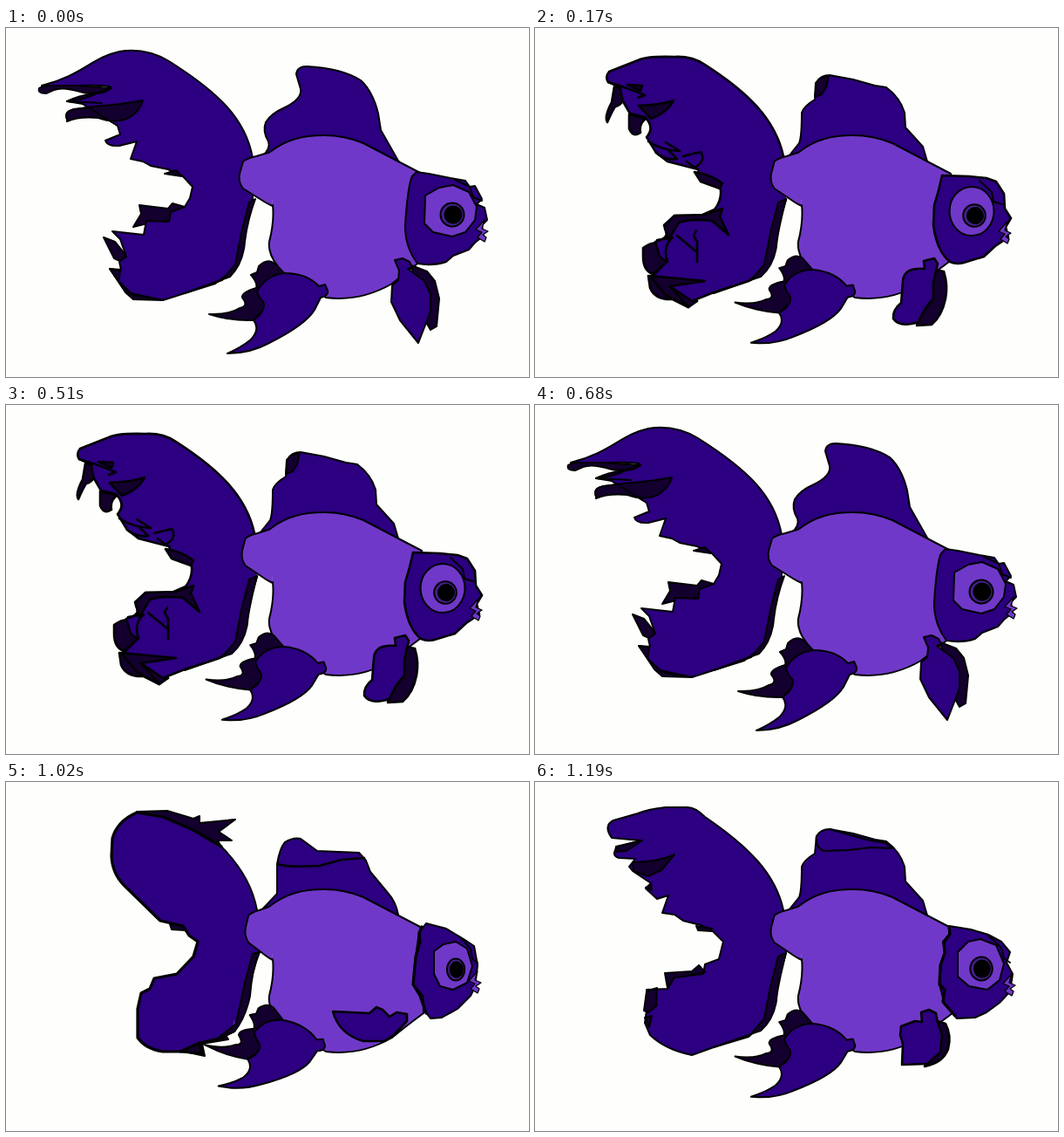
Recreate the animation shown at these times as an HTML page without scripts. Size 600 by 400 pixels, loop 1.36 s.

```html
<!DOCTYPE html>
<html lang="en">
<head>
<meta charset="utf-8">
<title>Swimming goldfish</title>
<style>
  html, body { margin: 0; width: 100%; height: 100%; overflow: hidden; background: #fefefc; }
  svg { display: block; width: 600px; height: 400px; }
  path, ellipse { stroke: #000; stroke-width: 2; stroke-linejoin: round; stroke-linecap: round; vector-effect: non-scaling-stroke; }
  .fin { fill: #2c0080; }
  .skin { fill: #7038c8; }
  .shade { fill: #14002e; }
  .ring { fill: #43208a; }
  .line { fill: none; }
  .bold { stroke-width: 3.2; }
  .firm { stroke-width: 2.6; }
  .thin { stroke-width: 1.3; }

  .pose { visibility: hidden; animation: once 1360ms step-end infinite; }
  .spread { animation: half 680ms step-end infinite; }
  .twice { animation-name: twice; }
  .curl { animation-delay: -1190ms; }
  .curled { animation-delay: -1020ms; }
  .fold { animation-delay: -510ms; }
  .folded { animation-delay: -340ms; }
  @keyframes half { 0% { visibility: visible; } 25%, 100% { visibility: hidden; } }
  @keyframes once { 0% { visibility: visible; } 12.5%, 100% { visibility: hidden; } }
  @keyframes twice {
    0%, 25% { visibility: visible; }
    12.5%, 37.5%, 100% { visibility: hidden; }
  }
</style>
</head>
<body>
<svg viewBox="0 0 600 400">
  <defs>
    <path id="stub" class="skin" d="M306 204Q297 200 293 197L272 184Q266 176 268 167L272 153Q277 149 287 147L304 142"/>
    <g id="trunk">
      <path class="skin" d="M303 142C321 128 340 123 365 123Q388 123 410 132L477 167L479 265Q456 282 443 293C415 309 390 312 367 309L318 280Q300 262 302 245Q308 222 306 203"/>
      <rect class="skin" x="301" y="145" width="10" height="52"/>
    </g>
    <g id="pelvic">
      <path class="shade" d="M319 281L307 269Q299 264 290 273L288 280L281 283Q289 292 287 298Q270 303 271 309Q279 319 268 321Q255 329 233 328Q258 336 284 335L300 318Z"/>
      <path class="fin" d="M359 296Q345 281 320 281Q298 283 288 302Q290 309 295 314Q298 320 291 329L284 335Q292 345 281 357Q270 366 254 373Q280 373 302 361Q344 340 354 323L361 309Q370 307 369 301L366 294Z"/>
    </g>
    <g id="pupil">
      <ellipse class="ring" rx="13.5" ry="13.5"/>
      <ellipse cx="1" rx="9.5" ry="9.5"/>
    </g>
    <path id="mouth" class="skin thin" d="M549 220L539 231L546 234L541 240L549 245L551 240L547 237L553 233L546 230Z"/>
    <path id="dorsal-mid" class="fin" d="M291 147L303 132Q306 125 306 97Q309 89 321 82L323 62Q328 54 338 54L365 59L390 66L403 68Q419 80 424 97L425 114L445 136L450 153"/>
    <path id="dorsal-low" class="fin" d="M293 147L311 128L311 94Q314 76 320 69Q330 63 338 65L357 79L405 81L413 90L418 103L438 127Q447 137 450 152"/>
    <path id="pectoral-low" class="fin firm" d="M375 263L417 265L425 258L432 261L440 269L448 264L460 266V274L445 290L434 297H410Q382 289 375 263Z"/>
    <path id="edge-mid" class="shade" d="M288 196Q278 235 277 250Q274 272 259 285L205 304L248 289L263 271L270 235L279 200Z"/>
    <path id="edge-low" class="shade" d="M291 195Q282 215 280 245Q275 270 262 286L240 296L264 277L274 230L283 197Z"/>
    <g id="body-mid">
      <use href="#stub" transform="translate(306) scale(.923 1) translate(-306)"/>
      <use href="#trunk"/>
      <use href="#pelvic" transform="matrix(1 .1 -.06 .982 16.2 -30.9)"/>
    </g>
    <g id="body-low">
      <use href="#stub" transform="translate(306) scale(.82 1) translate(-306)"/>
      <use href="#trunk"/>
      <use href="#pelvic" transform="matrix(1 .2 -.1 .965 27 -62.2)"/>
    </g>
  </defs>

  <g class="pose spread">
    <path class="shade" d="M38 69Q45 63 80 66L121 69Q100 78 85 73Q65 67 55 71L46 75Q36 75 38 69ZM70 84Q85 77 97 76L112 75L100 86ZM70 105Q66 96 78 93L98 91ZM153 203L186 207L191 201L205 205L192 220L158 225L146 228L155 213ZM112 240L125 245L138 261L133 268L124 264Z"/>
    <path class="fin" d="M283 149C275 104 244 74 187 38Q160 22 130 27C98 34 88 54 41 66L82 66Q122 65 121 69Q113 75 104 75Q92 82 70 84L88 87L128 112L131 122L114 129Q116 136 130 135L150 130L143 150L157 153L166 158L186 162L203 170L214 182L211 195L205 205L189 211L187 222L161 221L158 237L122 233L131 242L138 262L130 268L132 277L119 276L129 290L143 304L180 312L205 304L240 293L264 275L283 196Z"/>
    <path class="shade" d="M70 104Q66 95 80 93L100 90Q130 88 157 83Q154 95 141 103Q125 110 106 103Q84 101 70 107ZM182 167L195 163L202 170ZM119 276L131 278L129 291L146 306L180 312L146 311L137 303ZM286 196Q277 220 274 245Q272 270 257 285L205 304L248 289L263 271L270 235L279 200Z"/>
    <path class="line" d="M88 87L128 112M70 84L110 86"/>
    <path class="fin" d="M294 147Q304 138 301 130Q294 118 298 108Q304 98 320 91Q340 81 338 70L333 53Q334 44 345 44Q385 46 407 60Q421 73 427 98L430 117L451 154"/>
    <use href="#stub"/>
    <use href="#trunk"/>
    <use href="#pelvic"/>
    <path class="fin" d="M471 165L485 167L510 172L527 175L532 182L538 181L546 196L540 202L549 206L552 220L546 226L548 238L538 246L531 254L513 261L505 268Q490 273 472 270Q457 250 458 225Q461 180 466 170Z"/>
    <path class="line" d="M515 174L532 182L536 194L546 198"/>
    <use href="#mouth"/>
    <path class="skin" d="M481 192L497 183L513 180L531 188L540 205L538 220L527 234L512 239L490 234L480 224Z"/>
    <use href="#pupil" transform="translate(512 214)"/>
    <path class="shade" d="M465 272L483 279L492 290L497 310L494 342L487 346L478 330Z"/>
    <path class="fin" d="M446 266L455 264L463 268L466 274L461 276L480 290L487 305V325L473 361L452 335L442 314L443 295L450 289L451 278Z"/>
  </g>

  <g class="pose twice curl">
    <path class="shade firm" d="M91 67L104 71Q103 88 92 90Q88 96 83 108Q79 102 88 85ZM108 99L127 104Q119 110 121 120Q112 126 108 115ZM124 252Q135 244 142 247L152 268L135 282Q124 278 124 262ZM130 284L160 288L186 313L176 320L158 311Q138 312 132 298Z"/>
    <path class="fin firm" d="M285 147C276 105 245 74 195 42Q180 32 160 33Q128 32 118 37L85 50Q80 56 84 62L98 68Q99 80 102 86L109 98L126 102Q138 114 128 125L139 143L152 153L187 162L190 172L212 180Q216 195 206 208L190 215L160 215L149 230Q156 240 138 245L143 262L151 268L134 285L155 296L180 313L205 303L245 290L264 275L288 196"/>
    <path class="shade firm" d="M106 65L123 66L121 72ZM119 89Q145 88 159 83Q152 97 133 104ZM183 165Q200 167 215 178L212 184L190 176ZM160 215L195 214L215 207L212 216L222 237L203 221Q180 218 165 223L153 243L148 226ZM132 284L195 290L155 296L176 320L150 306Z"/>
    <path class="line firm" d="M84 62Q110 70 126 77L118 80M130 130Q145 140 166 141L150 131M139 143Q150 152 163 150L153 140M170 147L190 142Q197 152 183 160L174 153M185 232L182 238L186 245V268M163 238L186 257M140 243L158 240Q146 250 152 268"/>
    <use href="#edge-mid"/>
    <use href="#dorsal-mid"/>
    <path class="shade" d="M322 63L328 57L337 55L334 68L329 76L321 79Z"/>
    <use href="#body-mid"/>
    <path class="fin firm" d="M467 169L498 170L518 172L529 176L538 190L539 207L546 218L540 228L543 240L528 250L515 262L495 268Q485 272 476 268Q461 256 457 226L458 203L463 186Z"/>
    <path class="line" d="M510 175L524 188L526 199L536 202"/>
    <use href="#mouth" x="-7" y="2"/>
    <ellipse class="skin" cx="501" cy="210" rx="25.5" ry="28"/>
    <use href="#pupil" transform="translate(504 215) scale(.95)"/>
    <path class="shade firm" d="M458 277L469 279Q474 295 471 310Q467 330 455 340L438 341Z"/>
    <path class="fin firm" d="M446 267L458 264L462 270L457 292V310Q446 322 440 337Q418 344 411 333Q410 323 420 315L422 290Q423 274 447 276Z"/>
  </g>

  <g class="pose curled">
    <path class="shade bold" d="M160 41H131Q109 52 105 80L104 105Q109 122 125 138L150 165L152 177L160 158L185 166L213 188Q215 210 205 226L180 248Q154 266 155 285Q158 305 178 313H202L208 306L230 250L229 185L160 100Z"/>
    <path class="fin firm" d="M288 147C280 112 250 80 222 56L200 42H160L144 52Q132 58 134 65Q141 75 139 80Q133 96 133 110L155 109Q143 116 146 120L158 128Q151 138 155 138L170 140L164 150L185 163L210 165L227 182L228 207L212 224L178 255Q188 268 178 278L190 281L180 292L188 303L220 300L228 312L231 295L245 296L262 285Q278 265 280 230L290 195"/>
    <path class="line firm" d="M228 65H198L208 75L184 77L200 88L198 97Q186 95 170 81Q160 75 160 85Q168 105 192 122L170 123Q184 130 192 139L200 155L165 150"/>
    <path class="line bold" d="M160 42L144 52L134 65L139 80L133 110L155 109L146 120L158 128L155 138L170 140L164 150L185 163M210 167L227 185L229 210L222 225L230 255L227 264L242 295M212 224L178 255"/>
    <use href="#edge-low"/>
    <use href="#dorsal-low"/>
    <path class="shade" d="M314 76L322 66L337 64L338 74L327 86L313 89Z"/>
    <use href="#body-low"/>
    <path class="fin firm" d="M462 170L475 168L490 169L510 176L521 180L530 196L527 205L534 214L530 230L527 245L515 257L490 268L474 268L458 252L453 235L453 210L455 190Z"/>
    <path class="line" d="M502 175L516 184L520 197L530 200"/>
    <use href="#mouth" x="-18" y="4"/>
    <ellipse class="skin" cx="497" cy="210" rx="26" ry="29"/>
    <use href="#pupil" transform="translate(497 215) scale(.89 1)"/>
    <use href="#pectoral-low"/>
  </g>

  <g class="pose twice fold">
    <path class="fin" d="M285 147C276 105 245 74 195 40Q184 29 175 29H150Q130 31 118 36L90 44Q78 50 88 64L121 67L94 75Q87 84 96 87L115 88L108 97L112 102L133 116L127 122L140 134L153 130L146 150L160 152L170 159L190 164L203 170L216 183L211 203L195 209L193 220L160 224L152 237L128 238L131 250L140 255L128 262L126 276L132 290Q150 307 180 313L205 304L245 292L264 275L288 196Z"/>
    <path class="shade" d="M93 74L123 67L105 79L92 80ZM112 92Q140 92 160 83L145 101L130 108L113 102ZM127 121L133 117L134 124ZM185 165L203 168V171L187 170ZM149 219L180 217L188 210L195 218L175 222L160 224L152 236ZM128 240L140 236L139 257L130 264L125 262ZM126 270L134 268L131 281Z"/>
    <use href="#edge-mid"/>
    <use href="#dorsal-mid"/>
    <path class="line" d="M323 62Q321 74 331 79L360 78L385 75L409 76L402 70L380 66L338 54"/>
    <use href="#body-mid"/>
    <path class="fin" d="M475 165L500 169L520 175L535 183L545 195L541 207L548 220L545 240L533 253L518 264L505 270L484 271L470 255L464 232L466 210L470 195L468 183L475 175Z"/>
    <path class="line bold" d="M475 166L476 174L469 184L470 196L465 210L464 232L470 238L468 252L482 268"/>
    <path class="line" d="M520 176L535 190L538 202L545 207"/>
    <use href="#mouth" x="-2"/>
    <path class="skin" d="M485 195L497 183L511 180L529 187L538 208L533 227L519 238L498 234L485 223Z"/>
    <use href="#pupil" transform="translate(512 214) scale(.94 1)"/>
    <path class="shade firm" d="M461 274L471 277Q478 290 474 306Q468 322 447 326Z"/>
    <path class="fin firm" d="M443 264L452 261L460 265L462 276L467 290L465 310L450 323L421 324L422 300L419 290L420 280L436 274L444 275Z"/>
  </g>

  <g class="pose folded">
    <path class="shade" d="M150 34L185 33L215 42L222 39V47L263 43L244 57L259 67L243 67L250 80L215 62ZM188 163L203 164L206 170L190 169ZM200 308L222 300L250 287L255 295L225 300L228 314Z"/>
    <path class="fin bold" d="M247 74L215 55L180 40L150 35Q127 45 122 65L121 85Q122 105 135 118L177 159L203 165L210 176L220 183L215 200L196 220L170 225L165 237L155 242L151 260V293Q160 306 180 309L200 309L222 299L245 294L262 285"/>
    <path class="fin" d="M247 74Q281 108 288 147L290 195L280 230Q278 265 262 285"/>
    <polygon class="fin" points="243 76 252 84 262 272 254 284"/>
    <path class="line bold" d="M200 309L225 311L222 300"/>
    <use href="#edge-low"/>
    <use href="#dorsal-low"/>
    <path class="line firm" d="M312 94Q320 98 360 96L385 89L411 87"/>
    <use href="#body-low"/>
    <path class="fin" d="M482 162L505 168L525 180L537 188L541 210L538 235L533 245L518 260L500 270L487 271L480 262L478 245L467 232L470 200L474 172Z"/>
    <path class="line bold" d="M477 166L474 173L475 183L470 200L467 232L475 245L482 265"/>
    <path class="line" d="M520 177L533 191L535 203L541 207"/>
    <use href="#mouth" x="-8" y="-3"/>
    <path class="skin" d="M491 194L502 186L516 183L529 191L535 211L529 230L513 238L498 234L491 220Z"/>
    <use href="#pupil" transform="translate(516 215) scale(.75 .92)"/>
    <use href="#pectoral-low"/>
  </g>
</svg>
</body>
</html>
```
